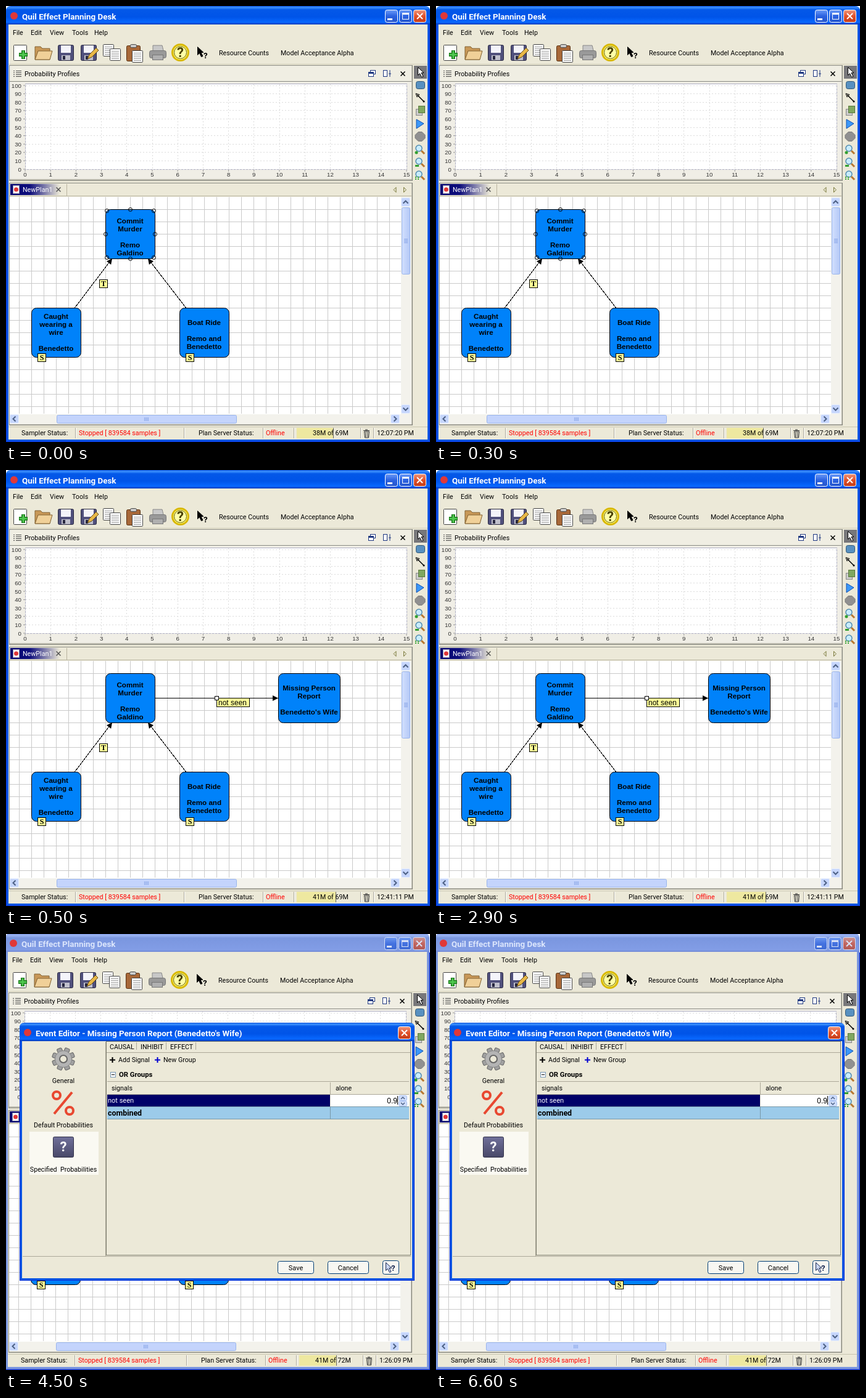
Write an HTML page that moves like this. It is 687 px wide and 708 px high and loops after 8 s.

```html
<!DOCTYPE html>
<html lang="en">
<head>
<meta charset="utf-8">
<title>Event planner</title>
<style>
html, body { margin: 0; width: 100%; height: 100%; overflow: hidden; background: #fff; }
svg { display: block; width: 687px; height: 708px; }
text { font: 10.7px Roboto, sans-serif; white-space: pre; }
.title { font-weight: bold; font-size: 13.4px; }
.node { font: bold 11.6px "Liberation Sans", Arial, sans-serif; text-anchor: middle; }
.axis { font: 9.7px "Liberation Sans", Arial, sans-serif; }
.note { font: 12px "Liberation Sans", Arial, sans-serif; }
.badge { font: bold 12px "Liberation Serif", serif; text-anchor: middle; }
.mid { text-anchor: middle; }
.end { text-anchor: end; }
.bold { font-weight: bold; font-size: 11.3px; }
.row { font-size: 11px; }
.total { font-weight: bold; font-size: 12.4px; }
.mark { font-weight: bold; font-size: 22px; text-anchor: middle; }
</style>
</head>
<body>
<svg id="stage" viewBox="0 0 687 708"></svg>
<script>
const TAN = '#ece9d8', GREY = '#8a8a82', NAVY = '#000068', YELLOW = '#ffff99';
const KILLER = 'Remo', VICTIM = 'Benedetto';

const rect = (x, y, w, h, fill, stroke = 'none', r = 0) =>
  `<rect x="${x}" y="${y}" width="${w}" height="${h}" rx="${r}" fill="${fill}" stroke="${stroke}"/>`;
const box = (x, y, w, h, fill, stroke, r) => rect(x + .5, y + .5, w - 1, h - 1, fill, stroke, r);
const path = (d, stroke = '#000', fill = 'none', width = 1, extra = '') =>
  `<path d="${d}" stroke="${stroke}" fill="${fill}" stroke-width="${width}" ${extra}/>`;
const circle = (x, y, r, fill, stroke = 'none', width = 1) =>
  `<circle cx="${x}" cy="${y}" r="${r}" fill="${fill}" stroke="${stroke}" stroke-width="${width}"/>`;
const text = (x, y, s, cls = '', fill = '#000') => `<text x="${x}" y="${y}" class="${cls}" fill="${fill}">${s}</text>`;
const group = (x, y, s) => `<g transform="translate(${x} ${y})">${s}</g>`;
const range = (n, f) => Array.from({ length: n }, (_, i) => f(i)).join('');
const gradient = (id, stops, across) =>
  `<linearGradient id="${id}" x2="${across ? 1 : 0}" y2="${across ? 0 : 1}">` +
  stops.map(([at, c]) => `<stop offset="${at}" stop-color="${c}"/>`).join('') + '</linearGradient>';

const defs = '<defs>' +
  gradient('active', [[0, '#0c50d8'], [.08, '#3c92ff'], [.2, '#0458e8'], [.6, '#0054e8'], [.88, '#0868ff'], [1, '#0038b8']]) +
  gradient('inactive', [[0, '#7088dc'], [.1, '#9cb6f4'], [.25, '#7a96df'], [.9, '#829de6'], [1, '#6e86d4']]) +
  gradient('tab', [[0, '#000070'], [.4, '#10107c'], [1, TAN]], true) +
  gradient('blueButton', [[0, '#6c9cf8'], [.5, '#2c62e0'], [1, '#2456cc']]) +
  gradient('redButton', [[0, '#f0987c'], [.5, '#e0512b'], [1, '#c43c18']]) +
  gradient('thumb', [[0, '#d2e0fe'], [1, '#b4c8f6']], true) +
  gradient('slate', [[0, '#70709a'], [1, '#484868']]) +
  '</defs>';

const plus = (x, y, r, c, w) => path(`M${x - r} ${y}h${2 * r}M${x} ${y - r}v${2 * r}`, c, 'none', w);
const cross = (x, y, r, c = '#000', w = 1.5) =>
  path(`M${x - r} ${y - r}l${2 * r} ${2 * r}M${x + r} ${y - r}l${-2 * r} ${2 * r}`, c, 'none', w);
const pointer = (x, y, fill = '#000', stroke = '#000') =>
  path(`M${x} ${y}v13l3-3 3 6 2.500-1-3-6h4z`, stroke, fill);

// Title bar on top of a four pixel border with a darker rim.
function windowFrame(w, h, caption, active) {
  const skin = active ? 'active' : 'inactive';
  return box(0, 29, w, h - 29, active ? '#0855e3' : '#7a96df', active ? '#0831d9' : '#6478d0') +
    rect(4, 30, w - 8, h - 34, TAN) +
    path(`M0 30V8Q0 0 8 0H${w - 8}Q${w} 0 ${w} 8V30z`, 'none', `url(#${skin})`) +
    circle(13, 16, 6, '#e03838') + text(26, 21.5, caption, 'title', active ? '#fff' : '#dce6fc');
}
const titleButton = (x, y, glyph, skin = 'blueButton') =>
  group(x, y, box(0, 0, 21, 21, `url(#${skin})`, '#fff', 3) + glyph);
const closeButton = (x, y) => titleButton(x, y, cross(10.5, 10.5, 4.5, '#fff', 2), 'redButton');

const floppy = box(0, 0, 26, 26, '#50507c', '#282840', 2) + rect(5, 1, 16, 12, '#f4f4fa') +
  rect(6, 17, 14, 8, '#c0c0cc') + rect(8, 18, 4, 6, '#282840');
const sheet = (x, y) => box(x, y, 18, 20, '#fff', '#444', 1) +
  range(5, i => path(`M${x + 3} ${y + 4.5 + 3 * i}h12`, '#999'));

function toolbar() {
  return group(11, 63, box(1, 0, 22, 26, '#fff', '#444', 1) + plus(17, 16, 7, '#187818', 6) + plus(17, 16, 6, '#50c850', 3)) +
    group(46, 63, path('M1 24V3h9l3 3h12v18z', '#806030', '#c89858') + path('M1 24L6 10H29L25 24z', '#806030', '#f0d098')) +
    group(84, 63, floppy) +
    group(121, 63, floppy + path('M11 23l3-7L25 5l4 4-11 11z', '#604818', '#e8b848')) +
    group(157, 62, sheet(0, 0) + sheet(11, 7)) +
    group(195, 62, box(0, 2, 23, 26, '#a86838', '#583010', 2) + box(6, 0, 11, 6, '#ccc', '#444', 2) + sheet(9, 10)) +
    group(232, 63, path('M6 9V1h15l2 8', '#888', '#c8c8c8') + box(0, 9, 28, 13, '#999', '#777', 3) + box(5, 16, 18, 9, '#b0b0b0', '#777')) +
    circle(282.5, 75.5, 13, '#fff878', '#d8b800', 3) + circle(282.5, 75.5, 10, '#ffffa8', '#605800') +
    text(282.5, 83, '?', 'mark', '#484000') +
    pointer(310.5, 66.5) + text(320, 85, '?', 'title') +
    text(345, 80, 'Resource Counts') + text(445, 80, 'Model Acceptance Alpha');
}

function chart() {
  const step = 41.2, gap = 13.6, dashed = 'stroke-dasharray="2 3" shape-rendering="crispEdges"';
  return box(5, 96, 654, 188, TAN, GREY) + rect(6, 97, 651, 25, '#f0eee3') + rect(6, 123, 651, 158, '#f0eee6') +
    path('M6 282H658V97M6 122.5H657', GREY) +
    range(4, i => path(`M12 ${105.5 + 3 * i}h2m2 0h9`, '#444')) + text(30, 114, 'Probability Profiles') +
    box(590, 104, 9, 7, '#fff', '#203880') + box(587, 107, 9, 8, '#fff', '#203880') + rect(587, 107, 9, 3, '#203880') +
    box(611, 104, 7, 11, '#fff', '#203880') + path('M622 104v6m-2 0h4m-2 0v5', '#203880') + cross(643, 110, 3.5) +
    box(31, 126, 619, 140, '#fff', '#b0b0c4') +
    range(11, i => path(`M32 ${265 - gap * i}H649`, '#dcdcdc', 'none', 1, dashed) + path(`M28 ${265 - gap * i}h3`, '#999') +
      text(25, 268.5 - gap * i, 10 * i, 'axis end', '#333')) +
    range(16, i => path(`M${31 + step * i} 127V265`, '#dcdcdc', 'none', 1, dashed) + path(`M${31 + step * i} 266v3`, '#999') +
      text(31 + step * i, 276.5, i, 'axis mid', '#333'));
}

const magnifier = (y, extra) => path(`M673 ${y + 2}l5 5`, '#b87830', 'none', 3) +
  circle(669, y - 2, 5, '#c8ecfc', '#508cb0', 1.5) + extra;

function sideTools() {
  return rect(661, 97, 21, 21, '#77777a') + pointer(667.5, 99.5, '#fff') +
    box(664, 122, 15, 13, '#5890c0', '#305878', 3) +
    path('M666 144L677 155', '#000', 'none', 1.5) + path('M664 142l6 2-4 4z') + circle(677, 155, 1.5, '#000') +
    box(664, 167, 11, 11, '#ccc', '#888') + box(668, 162, 11, 12, '#80a860', '#58783c') +
    path('M665 184l12 7-12 8z', '#1050b0', '#3c98f8') +
    path('M668 204.5h6l5 5v5l-5 5h-6l-5-5v-5z', '#777', '#909090') +
    magnifier(233, circle(665, 238, 2.5, '#30a030')) +
    magnifier(254, rect(663, 258, 6, 3, '#30a030')) +
    magnifier(275, path('M663 278h6m-6 3h6', '#30a030', 'none', 2, 'stroke-dasharray="2 2"'));
}

const labels = (x, y, lines) => lines.map((s, i) => text(x, y + 13 * i, s, 'node')).join('');
const node = (x, y, w, top, lines) => box(x, y, w + 1, 81, '#0082fa', '#000', 8) + labels(x + w / 2, top, lines);
const badge = (x, y, s) => box(x, y, 14, 14, YELLOW, '#000') + text(x + 7, y + 11, s, 'badge');

function arrow(x1, y1, x2, y2) {
  const angle = Math.atan2(y2 - y1, x2 - x1) * 180 / Math.PI;
  return path(`M${x1} ${y1}L${x2} ${y2}`, '#000', 'none', 1, 'shape-rendering="crispEdges"') +
    `<path d="M0 0L-9-4.500V4.500z" transform="translate(${x2} ${y2}) rotate(${angle})"/>`;
}

function scrollButton(x, y, turn) {
  return box(x, y, 15, 15, '#c6d6fc', '#e8f0ff', 2) +
    `<path d="M-4 2L0-2 4 2" fill="none" stroke="#4d6185" stroke-width="2" transform="translate(${x + 7.5} ${y + 7.5}) rotate(${turn})"/>`;
}

function scrollBars() {
  return rect(640, 310, 17, 369, '#f3f2ec') + rect(6, 663, 634, 16, '#f3f2ec') +
    scrollButton(640, 311, 0) + scrollButton(640, 647, 180) + scrollButton(6, 663, -90) + scrollButton(623, 663, 90) +
    box(641, 327, 14, 109, 'url(#thumb)', '#98b4ec', 2) + box(82, 664, 292, 14, '#c4d4fc', '#98b4ec', 2) +
    range(4, i => path(`M645 ${378.5 + 2 * i}h6M${224.5 + 2 * i} 668v6`, '#8ca8e8'));
}

function plan(step) {
  const handles = [[163, 332], [201, 330], [239, 332], [161, 370], [241, 370], [163, 408], [201, 410], [239, 408]];
  const report = arrow(241, 370.5, 441, 370.5) + box(341, 370, 54, 15, YELLOW, '#000') + box(338, 367, 7, 7, '#fff', '#000') +
    text(344, 382, 'not seen', 'note') + node(441, 330, 100, 358, ['Missing Person', 'Report', '', VICTIM + "'s Wife"]);
  return box(5, 287, 654, 394, TAN, GREY) + path('M658 288V680H6', GREY) +
    rect(7, 289, 80, 18, 'url(#tab)') + box(11, 291, 11, 14, '#fff', '#88a') + circle(16.5, 298, 3.5, '#e03838') +
    text(27, 302, 'NewPlan1', '', '#fff') + cross(85, 298, 3.5, '#555') +
    path('M98.5 289V308M6 308.5H657', '#b8b4a0') + path('M632 294.5v8l-4-4zM644.5 294.5v8l4-4z', '#787838') +
    rect(6, 310, 634, 353, '#fff') +
    range(31, i => path(`M${21.5 + 20 * i} 310V662`, '#cacaca')) + range(17, i => path(`M6 ${330.5 + 20 * i}H640`, '#cacaca')) +
    node(161, 330, 80, 353, ['Commit', 'Murder', '', KILLER, 'Galdino']) +
    node(41, 490, 80, 508, ['Caught', 'wearing a', 'wire', '', VICTIM]) +
    node(281, 490, 80, 518, ['Boat Ride', '', KILLER + ' and', VICTIM]) +
    arrow(111.5, 490, 172, 410) + arrow(291.5, 490, 230, 410) +
    badge(151, 444, 'T') + badge(51, 564, 'S') + badge(291, 564, 'S') +
    (step ? report : handles.map(([x, y]) => circle(x + .5, y + .5, 3, 'none', '#000')).join('')) +
    scrollBars();
}

function statusBar({ used, total, clock, shift, fill }) {
  const divider = x => path(`M${x + .5} 685V702`, '#aca899') + path(`M${x + 1.5} 685V702`, '#fff');
  return path('M4 683.5H683', '#c8c4b0') + text(25, 697, 'Sampler Status:') + divider(112) +
    text(118, 697, 'Stopped [ 839584 samples ]', '', '#f00') +
    group(shift, 0, divider(288) + text(312, 697, 'Plan Server Status:') + divider(416) + text(421, 697, 'Offline', '', '#f00') +
      divider(466) + rect(471, 685, fill, 17, '#eee8a0') + path(`M${471.5 + fill} 685v17`, '#666') +
      text(497, 697, `${used}M of ${total}M`) + divider(574) +
      path('M579 689.5h10M582 688h4M580.5 691l1 10h6l1-10zM583 692v8M586 692v8', '#333') +
      divider(595) + text(601, 697, clock));
}

function mainWindow(step) {
  const front = step < 2;
  const status = [
    { used: 38, total: 69, clock: '12:07:20 PM', shift: 0, fill: 59 },
    { used: 41, total: 69, clock: '12:41:11 PM', shift: 0, fill: 63 },
    { used: 41, total: 72, clock: '1:26:09 PM', shift: 5, fill: 60 }
  ][step];
  return windowFrame(687, 708, 'Quil Effect Planning Desk', front) +
    `<g opacity="${front ? 1 : .7}">` +
    titleButton(614, 6, rect(4, 14, 8, 3, '#fff')) +
    titleButton(637, 6, box(5, 5, 11, 11, 'none', '#fff') + rect(5, 5, 11, 3, '#fff')) + closeButton(660, 6) + '</g>' +
    [['File', 11], ['Edit', 40], ['View', 71], ['Tools', 107], ['Help', 143]].map(([s, x]) => text(x, 47, s)).join('') +
    toolbar() + path('M4 94.5H683', '#d0ccb8') + chart() + sideTools() + plan(step) + statusBar(status);
}

function gear(x, y) {
  return range(8, i => `<rect x="-4" y="-18.500" width="8" height="10" rx="2" fill="#a0a0a0" stroke="#666" transform="translate(${x} ${y}) rotate(${22 + 45 * i})"/>`) +
    circle(x, y, 13.5, '#b4b4b4', '#888') + circle(x, y, 6, TAN, '#666', 2);
}

const button = (x, w, s) => box(x, 531, w, 21, '#f8f7f2', '#003c74', 3) + text(x + w / 2, 545.5, s, 'mid row');

function dialog() {
  return group(22, 144, windowFrame(640, 419, `Event Editor - Missing Person Report (${VICTIM}'s Wife)`, true)) +
    closeButton(635, 150) +
    path('M27 523.5H656M161.5 175V523', '#aca899') +
    gear(93, 203) + text(93, 242, 'General', 'mid') +
    path('M107 257L78 292', '#e84830', 'none', 4) + circle(82, 262, 6, 'none', '#e84830', 4) + circle(103, 287, 6, 'none', '#e84830', 4) +
    text(93, 314, 'Default Probabilities', 'mid') +
    rect(38, 321, 112, 70, '#faf9f2') + box(76, 329, 34, 34, 'url(#slate)', '#303048', 2) + text(93, 353, '?', 'mark', '#fff') +
    text(93, 386, 'Specified  Probabilities', 'mid') +
    box(162, 174, 494, 348, TAN, '#808070') + path('M163 192.5H655M211.5 176v12M259.5 176v12M307.5 176v12', '#aca899') +
    text(168, 187, 'CAUSAL') + text(218, 187, 'INHIBIT') + text(266, 187, 'EFFECT') +
    plus(172.5, 204.5, 4.5, '#000', 2) + text(182, 208, 'Add Signal') +
    plus(245.5, 204.5, 4.5, '#0000d0', 2) + text(255, 208, 'New Group') +
    box(169, 224, 9, 9, '#fff', '#7898b5') + path('M171 228.5h5') + text(183, 232, 'OR Groups', 'bold') +
    path('M164 239.5H653M164 260.5H653M525.5 241V260', '#aca899') +
    text(171, 254, 'signals') + text(534, 254, 'alone') +
    rect(164, 261, 361, 19, NAVY) + text(165, 274, 'not seen', 'row', '#fff') +
    rect(526, 261, 127, 19, '#fff') + text(634, 275, '0.9', 'end note') + path('M634.5 263v14') +
    box(636, 262, 14, 9, '#d0defc', '#a8c0f0', 2) + box(636, 271, 14, 9, '#d0defc', '#a8c0f0', 2) +
    path('M640 268l3-3 3 3M640 274l3 3 3-3', '#4d6185', 'none', 1.5) +
    rect(164, 281, 489, 19, '#9ccbea') + path('M164 280.5H653M164 300.5H653M525.5 281V300', '#7898a8') +
    text(165, 295, 'combined', 'total') +
    button(440, 59, 'Save') + button(521, 67, 'Cancel') + box(610, 530, 27, 23, '#f8f7f2', '#003c74', 3) +
    pointer(615.5, 533.5, '#c8d4f0', '#182850') + text(624, 547, '?', 'title', '#182850');
}

const stage = document.getElementById('stage');
const start = performance.now();
let shown = -1;

function tick() {
  const time = (performance.now() - start) % 8000;
  const step = time < 500 ? 0 : time < 4500 ? 1 : 2;
  if (step !== shown) {
    shown = step;
    stage.innerHTML = defs + (step < 2 ? mainWindow(step) :
      rect(0, 30, 687, 678, '#0831d9') + group(-1, -1, mainWindow(step)) + dialog());
  }
  requestAnimationFrame(tick);
}
tick();
</script>
</body>
</html>
```
